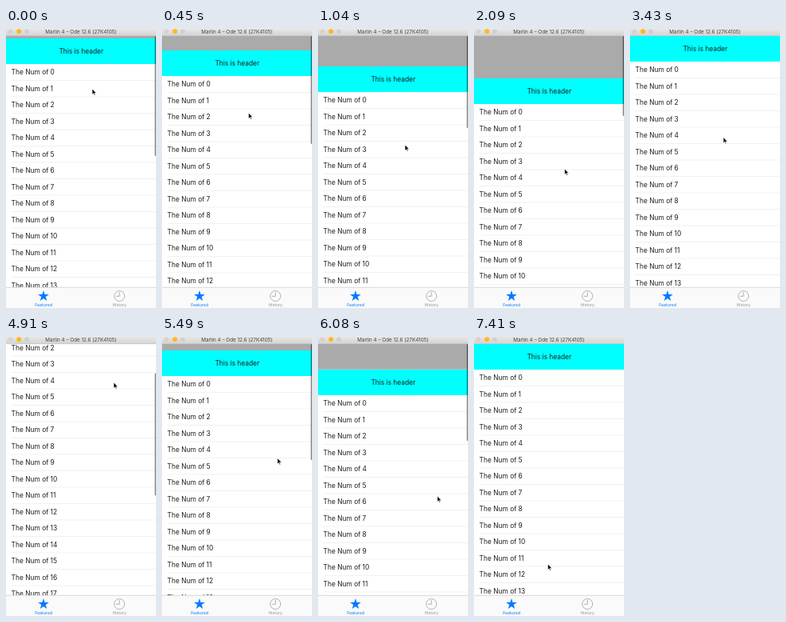
An HTML page that plays this animation: 188x350 px, repeating every 8 s.

```html
<!DOCTYPE html>
<html lang="en">
<head>
<meta charset="utf-8">
<title>Stretchy list header</title>
<style>
html, body { margin: 0; width: 188px; height: 350px; overflow: hidden; background: #fff; }
svg { display: block; font-family: Inter, "Liberation Sans", sans-serif; }
.mid { text-anchor: middle; }
.body { font-size: 8.4px; fill: #1c1c1c; }
.tab { font-size: 5.2px; }
</style>
</head>
<body>
<svg width="188" height="350" viewBox="0 0 188 350">
  <defs>
    <linearGradient id="chrome" x2="0" y2="1">
      <stop stop-color="#e9e9e9"/><stop offset="1" stop-color="#d3d3d3"/>
    </linearGradient>
    <clipPath id="view"><rect y="10" width="188" height="314"/></clipPath>
  </defs>
  <rect width="188" height="350" fill="#fff"/>
  <g clip-path="url(#view)">
    <rect id="back" y="10" width="188" fill="#aaa"/>
    <g id="list">
      <rect y="10" width="188" height="32" fill="#0ff"/>
      <text class="mid body" x="94.3" y="28.8">This is header</text>
    </g>
    <rect id="bar" x="186.5" width="1.5" rx=".75"/>
  </g>

  <rect width="188" height="10" fill="url(#chrome)"/>
  <path d="M0 9.75H188" stroke="#b8b8b8" stroke-width=".5"/>
  <circle cx="5.5" cy="4.3" r="2.8" fill="#dcd0cc"/>
  <circle cx="16.2" cy="4.3" r="3" fill="#fdb924"/>
  <circle cx="26" cy="4.3" r="2.8" fill="#cfcfcf"/>
  <text class="mid" x="94" y="6.6" font-size="6.3" fill="#444">Marlin 4 – Ode 12.6 (27K4105)</text>

  <rect y="324" width="188" height="26" fill="#fafafa"/>
  <path d="M0 324.25H188" stroke="#b5b5b5" stroke-width=".5"/>
  <path id="star" fill="#007aff"/>
  <text class="mid tab" x="47" y="348.2" fill="#007aff">Featured</text>
  <g fill="none" stroke="#929292" stroke-width=".7">
    <circle cx="142.2" cy="335" r="6.5"/>
    <path d="M142.2 330V335.3H138"/>
  </g>
  <text class="mid tab" x="142.2" y="348.2" fill="#929292">History</text>

  <path id="cursor" d="M0 0V7.3L1.7 5.8 2.8 8.3 3.9 7.8 2.8 5.4H5.2Z"
        fill="#000" stroke="#fff" stroke-width=".6"/>
</svg>
<script>
const LOOP = 8000, STEP = 148, TOP = 10, ROW = 20.5, ROWS = 30, BOUNCE = 6;
const el = id => document.getElementById(id);
const set = (id, attrs) => {
  for (const name in attrs) el(id).setAttribute(name, attrs[name]);
};

let rows = '';
for (let i = 0; i < ROWS; i++) {
  const y = 42 + i * ROW;
  rows += `<text class="body" x="6.6" y="${y + 13.3}">The Num of ${i}</text>
    <path d="M7 ${y + ROW}H188" stroke="#e2e2e2" stroke-width=".5"/>`;
}
el('list').insertAdjacentHTML('beforeend', rows);

const corners = Array.from({ length: 10 }, (_, i) => {
  const r = i % 2 ? 2.8 : 7.2, a = i * Math.PI / 5;
  return [47 + r * Math.sin(a), 335.2 - r * Math.cos(a)];
});
set('star', { d: `M${corners.join('L')}Z` });

// Cursor path: step, x, y
const path = [
  [0, 108, 76], [7, 109, 146], [10, 113.5, 176], [14, 113.5, 176],
  [20, 117, 136.5], [23, 117, 136.5], [31, 133, 50], [33, 135, 58],
  [39, 149.5, 200], [41, 149.5, 200], [47, 89, 272], [50, 92.5, 285], [60, 92.5, 285]
];
const drags = [
  { start: -1, end: 14, grab: 70 },
  { start: 23, end: 41, grab: 136.5 }
];

function cursorAt(step) {
  const i = path.findIndex(p => p[0] > step);
  const [s, x, y] = path[i - 1], [s2, x2, y2] = path[i];
  const k = (step - s) / (s2 - s);
  return [x + (x2 - x) * k, y + (y2 - y) * k];
}

// The list follows the pointer, at half speed past its top, and springs back on release.
function scrollAt(step) {
  const { end, grab } = drags.findLast(d => d.start < step);
  const moved = cursorAt(Math.min(step, end))[1] - grab;
  const left = Math.max(0, 1 - Math.max(0, step - end) / BOUNCE);
  return {
    offset: (moved > 0 ? moved / 2 : moved) * left ** 2,
    visible: Math.min(1, left * 3)
  };
}

function draw() {
  const step = Math.floor(performance.now() % LOOP / STEP);
  const [x, y] = cursorAt(step);
  const { offset, visible } = scrollAt(step);
  const pull = Math.max(0, offset), scrolled = Math.max(0, -offset);
  set('back', { height: pull });
  set('list', { transform: `translate(0 ${Math.round(offset * 2) / 2})` });
  set('bar', { y: TOP + scrolled * .465, height: 153 - pull, opacity: visible * .45 });
  set('cursor', { transform: `translate(${x} ${y})` });
  requestAnimationFrame(draw);
}
draw();
</script>
</body>
</html>
```
